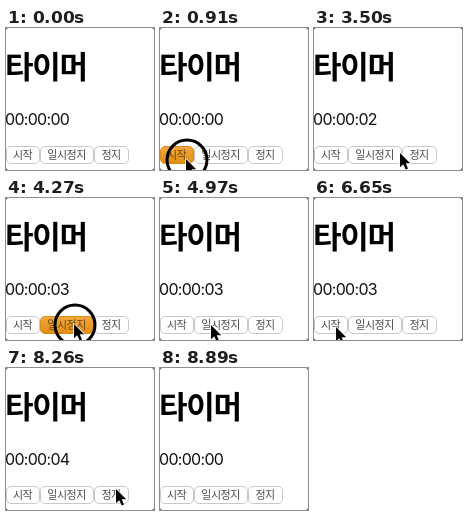
These frames come from a looping animation (148 by 142 pixels, 9.17 s). An HTML page:

```html
<!DOCTYPE html>
<html lang="ko">
<head>
<meta charset="utf-8">
<title>타이머</title>
<style>
  html, body { margin: 0; width: 100%; height: 100%; overflow: hidden; background: #fff; }
  svg { display: block; width: 100vw; height: 100vh; }
  text { font-family: "Noto Sans CJK KR", "Noto Sans CJK", sans-serif; }
  .title { font-size: 31px; font-weight: 700; letter-spacing: -1.3px; }
  .time { font-family: Inter, "Liberation Sans", sans-serif; font-size: 16px; letter-spacing: -.7px; fill: #111; }
  .btn text { font-size: 11px; letter-spacing: -.45px; text-anchor: middle; fill: #4c4c4c; }
  .btn rect { fill: #fff; stroke: #c8c8c8; }
  .btn.down rect { fill: url(#press); stroke: #d98a1c; }
  .btn.down text { fill: #6b4510; }
</style>
</head>
<body>
<svg viewBox="0 0 148 142">
  <defs>
    <linearGradient id="press" x1="0" y1="0" x2="0" y2="1">
      <stop offset="0" stop-color="#f3a93f"/>
      <stop offset="1" stop-color="#e08c12"/>
    </linearGradient>
  </defs>
  <path d="M0 0h2L0 2zM148 0h-2l2 2zM0 142h2l-2-2zM148 142h-2l2-2z" fill="#777"/>
  <text class="title" x="-1" y="49.6">타이머</text>
  <text class="time" id="time" x="-1" y="97">00:00:00</text>
  <g id="buttons"></g>
  <circle id="ring" r="20" fill="none" stroke="#000" stroke-width="3"/>
  <path id="cursor" d="M0 0V14.2L3.3 11.2 5.6 16.6 8 15.6 5.7 10.3H10.2Z"
        fill="#000" stroke="#fff" stroke-width="1.6" paint-order="stroke" stroke-linejoin="round"/>
</svg>
<script>
const LOOP = 9170, STEP = 70, SECOND = 1020;
const ENTER = 700, LEAVE = 8890, RESET = 8750;
const $ = id => document.getElementById(id);

// The pointer eases from each stop to the next.
const stops = [
  { at: 700, ms: 140, x: 26, y: 131 },
  { at: 3080, ms: 210, x: 94, y: 124 },
  { at: 3430, ms: 350, x: 68, y: 126 },
  { at: 4900, ms: 280, x: 22, y: 129 },
  { at: 6650, ms: 350, x: 62, y: 124 },
  { at: 7630, ms: 350, x: 113, y: 121 },
  { at: 8120, ms: 280, x: 108, y: 121 }
];
const clicks = [
  { at: 910, ms: 70, btn: 0 },
  { at: 4270, ms: 140, btn: 1 },
  { at: 6020, ms: 70, btn: 0 },
  { at: 7630, ms: 70, btn: 1 },
  { at: 8680, ms: 70, btn: 2 }
];
const runs = [[1040, 4270], [6110, 7630]];

let left = 0;
$("buttons").innerHTML = [["시작", 34], ["일시정지", 54], ["정지", 35]].map(([label, w]) => {
  const x = left;
  left += w;
  return `<g class="btn"><rect x="${x + .5}" y="118.5" width="${w - 1}" height="17" rx="4.5"/>
    <text x="${x + w / 2 - .4}" y="131">${label}</text></g>`;
}).join("");
const btns = [...document.querySelectorAll(".btn")];

const clamp = (v, lo, hi) => Math.min(hi, Math.max(lo, v));
const easeOut = p => 1 - (1 - p) ** 1.6;
const show = (el, on) => el.setAttribute("visibility", on ? "visible" : "hidden");
const place = (el, x, y) => el.setAttribute("transform", `translate(${x} ${y})`);

function pointer(t) {
  let x = 38, y = 139;
  for (const s of stops) {
    const p = easeOut(clamp((t - s.at) / s.ms, 0, 1));
    x += (s.x - x) * p;
    y += (s.y - y) * p;
  }
  return [Math.round(x), Math.round(y)];
}

function seconds(t) {
  if (t >= RESET) return 0;
  return runs.reduce((sum, [a, b]) => sum + Math.floor((clamp(t, a, b) - a) / SECOND), 0);
}

function draw(t) {
  const [x, y] = pointer(t);
  const click = clicks.find(c => t >= c.at && t < c.at + c.ms);
  $("time").textContent = "00:00:" + String(seconds(t)).padStart(2, "0");
  show($("cursor"), t >= ENTER && t < LEAVE);
  show($("ring"), click);
  place($("cursor"), x, y);
  place($("ring"), x + 1, y + 1);
  btns.forEach((b, i) => b.classList.toggle("down", !!click && click.btn === i));
}

const start = performance.now();
function frame() {
  const t = (performance.now() - start) % LOOP;
  draw(Math.floor(t / STEP) * STEP);
  requestAnimationFrame(frame);
}
frame();
</script>
</body>
</html>
```
